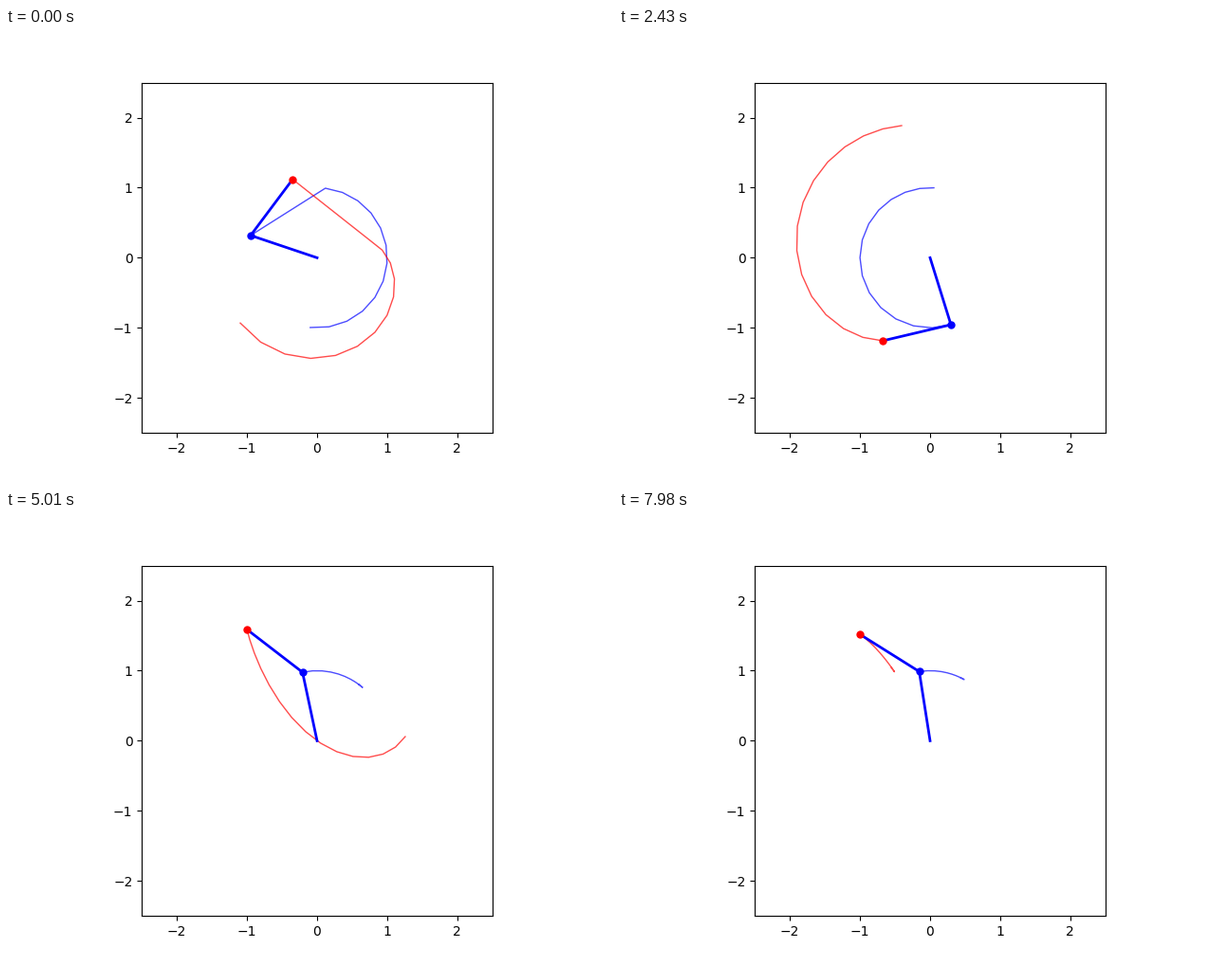
Recreate the animation shown at these times as a matplotlib script. Size 640x480 px, loop 8000 ms.

```python
import numpy as np
import matplotlib.pyplot as plt
from matplotlib.animation import FuncAnimation

LOOP_MS = 8000
TICK_MS = 20
STEP_MS = 30
TRAIL = 15

# Key poses: step, then both arm angles in degrees from the x axis.
steps, upper, lower = np.array([
    (0, 521.4, 53.2), (16, 412, -80), (34, 153.2, -216.3),
    (48, 14.9, -264.9), (67, 86.9, -242.6), (81, 287.3, -166.7),
    (88, 391, -152), (98, 503, -247), (116, 474.7, -245.3),
    (130, 303.6, -219.5), (153, 53.7, -408.3), (167, 102, -577.6),
    (189, 361, -721), (204, 475.9, -649.1), (218, 420.2, -500.2),
    (239, 148, -249), (252, 64.3, -188.5), (266, 98.9, -212.1),
]).T


def spline(t, x, y):
    """Smooth cubic spline through (x, y) with parabolic end pieces."""
    h = np.diff(x)
    rise = np.diff(y) / h
    n = len(x)
    lhs, rhs = np.eye(n), np.zeros(n)
    lhs[0, 1] = lhs[-1, -2] = 1
    rhs[0], rhs[-1] = 2 * rise[0], 2 * rise[-1]
    for i in range(1, n - 1):
        a, b = 1 / h[i - 1], 1 / h[i]
        lhs[i, i - 1:i + 2] = a, 2 * (a + b), b
        rhs[i] = 3 * (a * rise[i - 1] + b * rise[i])
    speed = np.linalg.solve(lhs, rhs)

    i = np.clip(np.searchsorted(x, t, side="right") - 1, 0, n - 2)
    s = (t - x[i]) / h[i]
    return (y[i] * (1 + 2 * s) * (1 - s) ** 2 + y[i + 1] * s * s * (3 - 2 * s)
            + h[i] * s * (1 - s) * (speed[i] * (1 - s) - speed[i + 1] * s))


def unit(angle):
    return np.array([np.cos(np.radians(angle)), np.sin(np.radians(angle))])


# the swing just before the loop only shows as a fading trail
u = np.arange(1 - TRAIL, -1) + 8
lead_upper = 355.5 + 14.9 * u - 0.047 * u ** 2
lead_lower = 260.1 + 11.2 * u - 0.46 * u ** 2

t = np.maximum(np.arange(-1, LOOP_MS // STEP_MS + 1), 0)
elbow = unit(np.append(lead_upper, spline(t, steps, upper)))
tip = elbow + unit(np.append(lead_lower, spline(t, steps, lower)))

fig, ax = plt.subplots(figsize=(6.4, 4.8), dpi=100)
ax.set_xlim(-2.5, 2.5)
ax.set_ylim(-2.5, 2.5)
ax.set_aspect("equal")

elbow_trail, = ax.plot([], [], "-", color="blue", lw=1, alpha=0.7)
tip_trail, = ax.plot([], [], "-", color="red", lw=1, alpha=0.7)
arms, = ax.plot([], [], "-", color="blue", lw=2)
elbow_dot, = ax.plot([], [], "o", color="blue", ms=5)
tip_dot, = ax.plot([], [], "o", color="red", ms=5)


def update(tick):
    step = (tick * TICK_MS + TICK_MS // 2) // STEP_MS
    now = step + TRAIL - 1
    window = slice(step, now + 1)
    elbow_trail.set_data(*elbow[:, window])
    tip_trail.set_data(*tip[:, window])
    arms.set_data(*np.column_stack([(0, 0), elbow[:, now], tip[:, now]]))
    elbow_dot.set_data(*elbow[:, now:now + 1])
    tip_dot.set_data(*tip[:, now:now + 1])
    return elbow_trail, tip_trail, arms, elbow_dot, tip_dot


anim = FuncAnimation(fig, update, frames=LOOP_MS // TICK_MS, interval=TICK_MS,
                     repeat=True, repeat_delay=0, blit=False)
plt.show()
```
